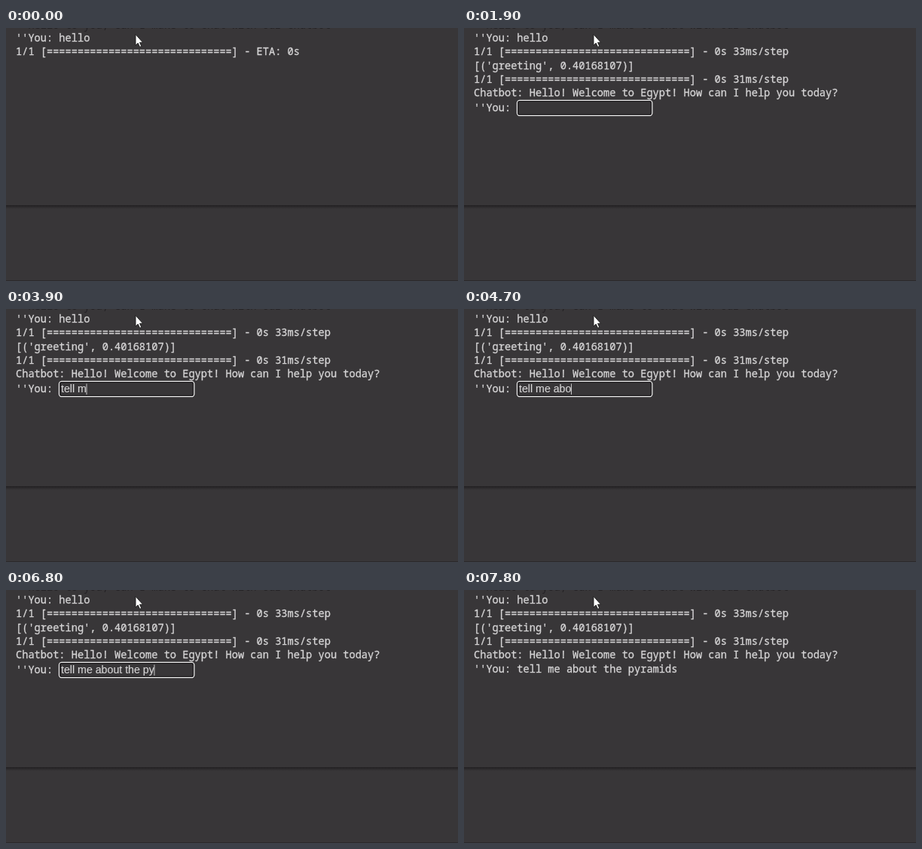
These frames come from a looping animation (600x337 px, 8 s). An HTML page:

```html
<!DOCTYPE html>
<html lang="en">
<head>
<meta charset="utf-8">
<title>Chatbot console</title>
<style>
  html, body { margin: 0; width: 100%; height: 100%; overflow: hidden; background: #383638; }
  svg { display: block; width: 600px; height: 337px; }
  text {
    white-space: pre; fill: #d6d5d6; stroke: #d6d5d6; stroke-width: .3;
    font: 13.67px "Noto Sans Mono", monospace;
  }
  #typed { font: 14.2px "Liberation Sans", Arial, sans-serif; stroke-width: .15; }
  #scrolled { fill: #252326; stroke: none; }
</style>
</head>
<body>
<svg viewBox="0 0 600 337">
  <defs>
    <linearGradient id="shade" x2="0" y2="1">
      <stop offset="0" stop-color="#222022"/>
      <stop offset="1" stop-color="#383638"/>
    </linearGradient>
  </defs>
  <rect width="600" height="337" fill="#383638"/>
  <rect y="236" width="600" height="5" fill="url(#shade)"/>
  <rect y="336" width="600" height="1" fill="#2b292b"/>
  <text x="29.4" y=".8" id="scrolled">Hello to you, can I make to chat with our chatbot</text>

  <text x="13" y="17.5">''You: hello</text>
  <text x="13" y="36" id="progress"></text>
  <g id="reply">
    <text x="13" y="54.7">[('greeting', 0.40168107)]</text>
    <text x="13" y="73.3">1/1 [==============================] - 0s 31ms/step</text>
    <text x="13" y="91.3">Chatbot: Hello! Welcome to Egypt! How can I help you today?</text>
    <text x="13" id="prompt"></text>
  </g>
  <g id="field">
    <rect x="70.5" y="96.4" width="179.3" height="20.3" rx="3.5" fill="#383638" stroke="#f0f0f0" stroke-width="1.3"/>
    <rect x="71.8" y="97.7" width="176.7" height="17.7" rx="2.3" fill="none" stroke="#1d1b1d" stroke-width="1.2"/>
    <text x="73" y="111" id="typed"></text>
    <rect y="99.5" width="1" height="14.5" fill="#c8c7c8" id="caret"/>
  </g>

  <path d="M172 8.5V23.1L175.2 20.1L177.6 25.3L179.8 24.4L177.5 19.3H181.6Z" fill="#fff" stroke="#1a1a1a" stroke-width=".9"/>
</svg>
<script>
const LOOP = 8000, FOCUS = 220, REPLY = 300, SUBMIT = 7800, BLINK = 535;
const message = "tell me about the pyramids";
// Time of each key press in ms, one per character of the message
const keys = [3200, 3300, 3300, 3400, 3700, 3900, 4000, 4100, 4400, 4600, 4700, 5000, 5100,
  5300, 5400, 5500, 5600, 5660, 6300, 6800, 6900, 7200, 7300, 7400, 7500, 7600];

const el = id => document.getElementById(id);
const [progress, reply, prompt, field, typed, caret] =
  ["progress", "reply", "prompt", "field", "typed", "caret"].map(el);
const show = (node, on) => node.setAttribute("visibility", on ? "visible" : "hidden");

function draw(t) {
  const replied = t >= REPLY, sent = t >= SUBMIT, editing = replied && !sent;
  progress.textContent = `1/1 [${"=".repeat(30)}] - ${replied ? "0s 33ms/step" : "ETA: 0s"}`;
  show(reply, replied);
  show(field, editing);
  prompt.textContent = "''You: " + (sent ? message : "");
  prompt.setAttribute("y", sent ? 109.8 : 110.7);

  const count = keys.filter(k => k <= t).length;
  typed.textContent = message.slice(0, count);
  caret.setAttribute("x", 72.6 + (count ? typed.getComputedTextLength() : 0));

  // The caret restarts its blink after every key press
  const idle = t - (count ? keys[count - 1] : FOCUS);
  show(caret, editing && Math.floor(idle / BLINK) % 2 === 0);
}

function tick() {
  draw(performance.now() % LOOP);
  requestAnimationFrame(tick);
}
tick();
</script>
</body>
</html>
```
